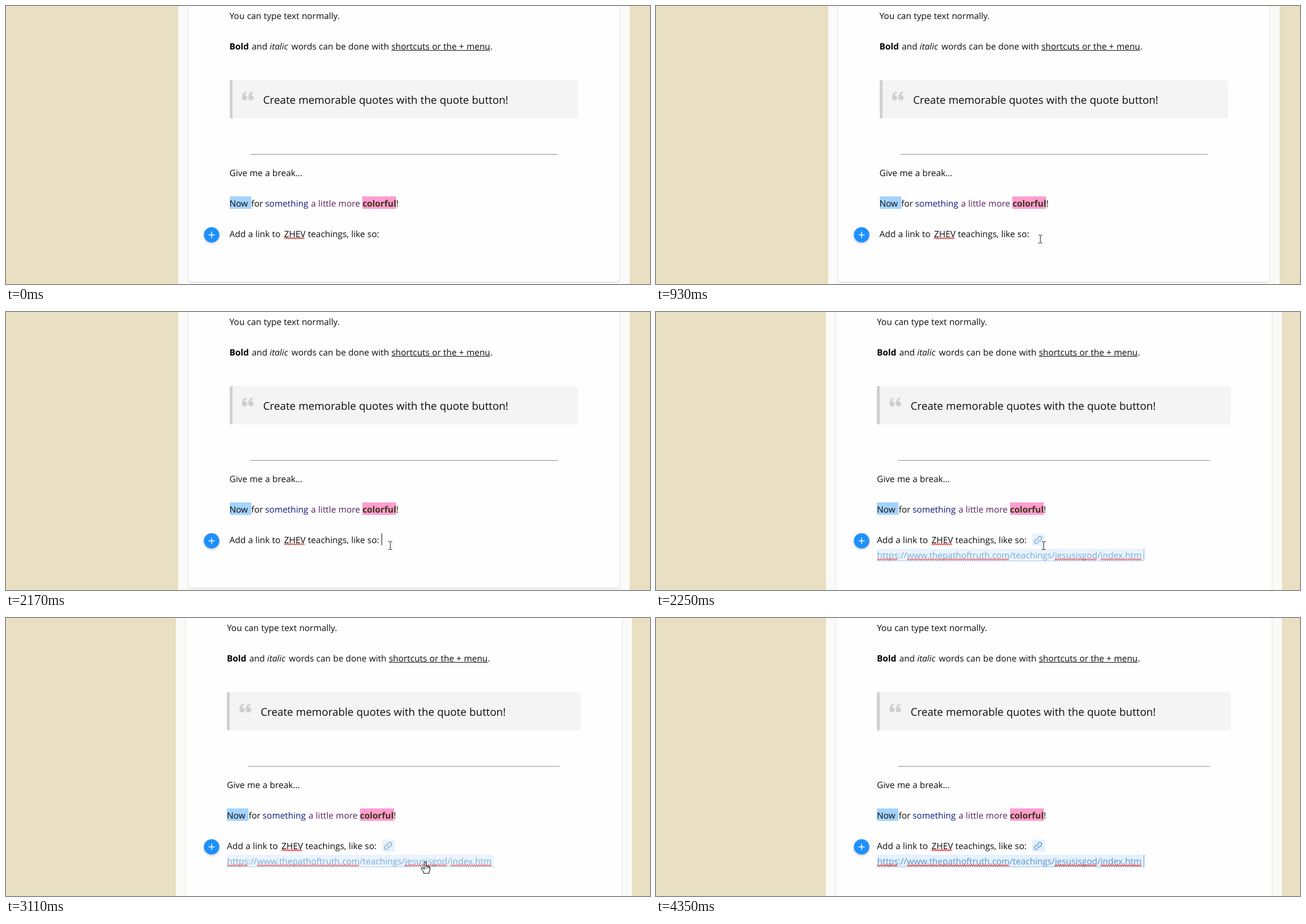
Write an HTML page with a canvas that moves like this. It is 1137x492 px and loops after 4820 ms.

```html
<!DOCTYPE html>
<html lang="en">
<head>
<meta charset="utf-8">
<title>Editor link demo</title>
<style>
html, body { margin: 0; width: 100%; height: 100%; overflow: hidden; background: #e9e0c3; }
canvas { display: block; }
</style>
</head>
<body>
<canvas id="stage" width="1137" height="492"></canvas>
<script>
const ctx = document.getElementById('stage').getContext('2d', { alpha: false });
const LOOP = 4820;
const PASTE = 2250;
const SANS = '"Open Sans", "Noto Sans", sans-serif';
const BODY = '15.4px ' + SANS;
const INK = '#0c0c0c';
const LINK = '#5a93c8';
const URL_TEXT = 'https://www.thepathoftruth.com/teachings/jesusisgod/index.htm';
const MISSPELLED = ['https', 'www.thepathoftruth.com', 'jesusisgod', 'index.htm'];

// Pointer stops: time, x, y, shape
const POINTER = [
  [0, 0, 0, ''],
  [460, 694, 488, 'beam'], [540, 692, 470, 'beam'], [620, 689, 448, 'beam'],
  [690, 685, 431, 'beam'], [770, 681, 419, 'beam'], [850, 679, 414, 'beam'],
  [930, 678, 412, 'beam'], [1010, 681, 414, 'beam'], [1090, 680, 414, 'beam'],
  [1160, 678, 413, 'beam'], [2250, 684, 413, 'beam'], [2330, 693, 413, 'beam'],
  [2480, 0, 0, ''],
  [2950, 697, 416, 'beam'], [3030, 714, 427, 'hand'], [3110, 740, 431, 'hand'],
  [3190, 800, 437, 'hand'], [3270, 872, 447, 'beam'], [3340, 946, 458, 'beam'],
  [3420, 1017, 470, 'arrow'], [3500, 1034, 478, 'arrow'], [3580, 1043, 483, 'arrow'],
  [3660, 1050, 488, 'arrow'], [3730, 1052, 491, 'arrow'], [3810, 0, 0, '']
];
const CARET_ON = [[1090, 1620], [2100, 2790], [3340, 3890], [4350, LOOP]];

const HAND = new Path2D('M-1.5 1Q0-.8 1.5 1V8Q3 6.7 4.2 8.4Q5.8 7.6 6.7 9.4Q8.5 8.8 8.6 11V14Q8.5 17 6.7 18.5V21H-2.5V18.8L-6.6 12.8Q-7.3 10.6-5.2 10.7Q-3.8 11-1.5 13.4Z');
const ARROW = new Path2D('M.5.5V16.5L4.2 13L6.6 18.6L9.2 17.5L6.8 12.1H11.9Z');
const QUOTE = new Path2D('M0 10.3C0 4.8 3.2.6 7.8 0L8.8 2C6.3 3 4.9 4.5 4.6 6.4A4.7 4.7 0 1 1 0 10.3Z');
const CHAIN = new Path2D('M-1.4 1.1A3.3 3.3 0 0 0 3.5 1.4L5.7-.9A3.3 3.3 0 0 0 1-5.5L-.1-4.4M1.4-1.1A3.3 3.3 0 0 0-3.5-1.4L-5.7.9A3.3 3.3 0 0 0-1 5.5L.1 4.4');

function rect(x, y, w, h, color, radius = 0) {
  ctx.fillStyle = color;
  ctx.beginPath();
  ctx.roundRect(x, y, w, h, radius);
  ctx.fill();
}

// A block centred on the page, snapped to whole pixels
function block(left, y, h, color, radius) {
  const x = Math.round(left);
  rect(x, y, 1405 - 2 * x, h, color, radius);
}

function text(str, x, y, color = INK, font = BODY) {
  ctx.font = font;
  ctx.fillStyle = color;
  ctx.fillText(str, x, y);
}

function width(str) {
  ctx.font = BODY;
  return ctx.measureText(str).width;
}

function shadow(color, blur, dy) {
  ctx.shadowColor = color;
  ctx.shadowBlur = blur;
  ctx.shadowOffsetY = dy;
}

function squiggle(x, y, w, color) {
  ctx.strokeStyle = color;
  ctx.lineWidth = 1.3;
  ctx.beginPath();
  for (let i = 0; i <= w; i += 2) ctx.lineTo(x + i, y + (i % 4 ? -1 : 1));
  ctx.stroke();
}

function drawPage(dx, pasted) {
  rect(0, 0, 1137, 492, '#e9e0c3');
  block(304 + dx, 0, 492, '#fafaf9');
  shadow('rgba(0,0,0,.17)', 3, 1);
  block(322 + dx, -20, pasted ? 535 : 508, '#fefefe', 5);
  shadow('transparent', 0, 0);

  block(394.5 + dx, 131, 68, '#f4f4f4', 5);
  rect(Math.round(394.5 + dx), 131, 5, 68, '#cfcfcf', [3, 0, 0, 3]);
  ctx.fillStyle = '#cfcfcf';
  for (const x of [416.6, 427.9]) {
    ctx.save();
    ctx.translate(x + dx, 151.5);
    ctx.fill(QUOTE);
    ctx.restore();
  }
  block(431 + dx, 262, 1, '#9a9a9a');
  block(431 + dx, 263, 1, '#eeeeee');

  shadow('rgba(0,0,0,.25)', 4, 1.5);
  rect(349.4, 391.4, 27.2, 27.2, '#1e90ff', 13.6);
  shadow('transparent', 0, 0);
  rect(357.5, 404.3, 11, 1.5, '#fff');
  rect(362.3, 399.5, 1.5, 11, '#fff');
}

function drawText(dx, pasted) {
  rect(Math.round(394.5 + dx), 337, 38, 22, '#a3d3ff');
  rect(Math.round(629.4 + dx), 337, 60, 22, '#ff9dd1');

  ctx.save();
  ctx.translate(dx, 0);
  text('You can type text normally.', 394.5, 23);

  text('Bold', 394.5, 77, '#000', 'bold ' + BODY);
  text('and', 434, 77);
  text('italic', 465.5, 77, INK, 'italic ' + BODY);
  text('words can be done with', 504, 77);
  text('shortcuts or the + menu', 680.5, 77);
  rect(680.5, 78, 174.5, 1, INK);
  text('.', 855, 77);

  text('Create memorable quotes with the quote button!', 454, 173, INK, '18.82px ' + SANS);
  text('Give me a break...', 394.5, 301);

  text('Now', 394.5, 355);
  text('for', 433, 355);
  text('something', 457.5, 355, '#10197c');
  text('a little more', 538.5, 355, '#5a1f5e');
  text('colorful', 629.4, 355, '#3d3514', 'bold ' + BODY);
  text('!', 689, 355);

  text('Add a link to', 394.5, 409);
  text('ZHEV', 491, 409);
  squiggle(491, 411, 37, pasted ? '#f03030' : '#c4453c');
  text('teachings, like so:', 533, 409);
  ctx.restore();
}

function drawLink(hover, caret) {
  const left = 390.5;
  ctx.globalAlpha = hover ? 0.76 : 1;
  rect(664, 392, 23, 22, '#e4f1fe', [4, 0, 0, 4]);
  rect(390, 419, 471, 22, '#e4f1fe', [0, 4, 4, 0]);
  ctx.save();
  ctx.translate(674.5, 403.5);
  ctx.strokeStyle = LINK;
  ctx.lineWidth = 1.4;
  ctx.lineCap = 'round';
  ctx.stroke(CHAIN);
  ctx.restore();
  text(URL_TEXT, left, 436, LINK);
  for (let x = 390; x < 861; x += 2) rect(x, 440, 1, 1, LINK);
  for (const word of MISSPELLED) {
    const start = width(URL_TEXT.slice(0, URL_TEXT.indexOf(word)));
    squiggle(left + start, 438, width(word), '#f03030');
  }
  if (caret) rect(861, 419, 1, 21, LINK);
  ctx.globalAlpha = 1;
}

function drawPointer(x, y, shape) {
  if (shape === 'beam') {
    for (const end of [y - 7, y + 7]) {
      rect(x - 3, end, 3, 1, '#222');
      rect(x + 1, end, 3, 1, '#222');
    }
    rect(x, y - 6, 1, 13, '#222');
  } else if (shape) {
    const path = shape === 'hand' ? HAND : ARROW;
    ctx.save();
    ctx.translate(x, y);
    ctx.fillStyle = '#fff';
    ctx.strokeStyle = '#111';
    ctx.lineWidth = 1.1;
    ctx.fill(path);
    ctx.stroke(path);
    if (shape === 'hand') {
      for (const fx of [1.5, 4.2, 6.7]) rect(fx - 0.4, 8.5, 0.9, 4, '#111');
    }
    ctx.restore();
  }
}

function draw(t) {
  const pasted = t >= PASTE;
  const dx = pasted ? -4.5 : 0;
  const [, x, y, shape] = POINTER.findLast(p => p[0] <= t);
  const overIcon = shape === 'beam' && x > 663 && x < 687;
  const caret = CARET_ON.some(([on, off]) => t >= on && t < off);

  drawPage(dx, pasted);
  drawText(dx, pasted);
  if (pasted) drawLink(shape === 'hand' || overIcon, caret);
  else if (caret) rect(663, 392, 1, 21, INK);
  drawPointer(x, y, shape);
}

ctx.textRendering = 'geometricPrecision';
ctx.wordSpacing = '0.3px';
const begin = performance.now();
function tick() {
  draw((performance.now() - begin) % LOOP);
  requestAnimationFrame(tick);
}
tick();
</script>
</body>
</html>
```
